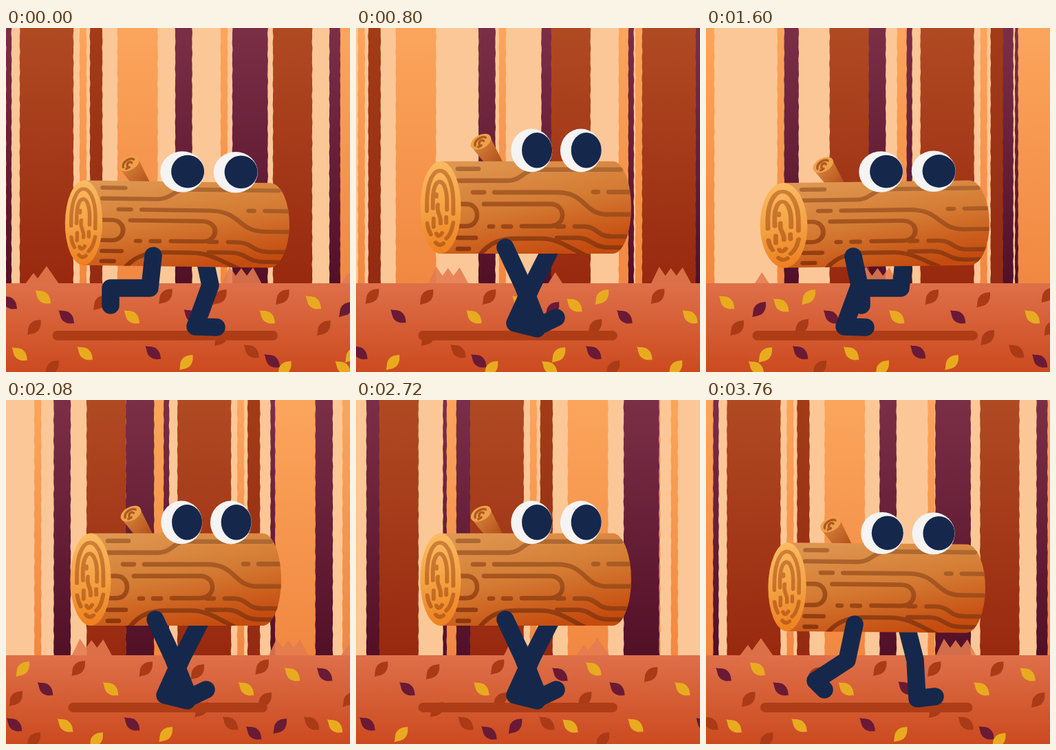
An HTML page with a canvas for the animation above (3840 ms loop, 500 by 500 pixels).

```html
<!DOCTYPE html>
<html lang="en">
<head>
<meta charset="utf-8">
<title>Walking log</title>
<style>
  html, body { margin: 0; width: 100%; height: 100%; overflow: hidden; background: #fcc797; }
  canvas { display: block; width: 500px; height: 500px; }
</style>
</head>
<body>
<canvas id="stage" width="500" height="500"></canvas>
<script>
const c = document.getElementById('stage').getContext('2d');
const STEP = 80, STEPS = 48;
const NAVY = '#15284c', HORIZON = 371;

function grad(x0, y0, x1, y1, ...stops) {
  const g = c.createLinearGradient(x0, y0, x1, y1);
  stops.forEach((s, i) => g.addColorStop(i / (stops.length - 1), s));
  return g;
}
const down = (a, b) => grad(0, 0, 0, HORIZON, a, b);
const BARK = {
  brown: down('#b04a23', '#98290f'),
  dark: down('#a23c17', '#942a12'),
  orange: down('#fba55c', '#f18841'),
  purple: down('#7b2f47', '#521027')
};
const GROUND = grad(0, HORIZON, 0, 500, '#de7049', '#cc4a1f');
const LEAF = { Y: '#e8ab20', P: '#6a1a35', B: '#aa3b16' };

// Front trees: x, width, bark; they repeat every 500 px.
const TREES = [
  [20, 78, 'brown'], [107, 10, 'orange'], [122, 18, 'dark'], [162, 58.5, 'orange'],
  [312, 10, 'orange'], [388, 57, 'brown'], [486, 15, 'orange'], [0, 8, 'purple']
];
// Far trees: x at loop start, x at loop end, width, bark, last step shown.
const FAR = [
  [470, 230, 24, 'purple', 12], [970, 470, 24, 'purple', 48],
  [486, 102, 10, 'orange', 41], [677, 330, 11, 'orange', 48],
  [329, 43, 51.5, 'purple', 48], [535, 329, 51.5, 'purple', 48],
  [246, -80, 24.5, 'purple', 48], [548, 246, 24.5, 'purple', 48]
];

// Leaves on a 1000 px ground strip: "x y colour+tilt".
const LEAVES = `5 399 P\\,54 391 Y\\,88 420 P\\,137 399 B/,183 420 Y\\,232 390 B/,270 419 P\\,311 391 B/,
380 420 Y\\,402 391 B/,447 399 Y\\,494 409 P/,526 403 Y\\,566 391 Y/,599 420 P\\,647 390 B/,694 420 Y\\,
745 391 B/,783 420 P\\,820 395 B/,891 420 Y\\,914 388 B/,958 399 Y\\,41 435 B/,313 451 B/,
462 436 B/,556 434 B/,826 450 B/,918 436 B/,20 474 Y\\,67 494 B/,115 473 Y\\,
214 472 P\\,262 486 Y/,357 470 B\\,387 484 P\\,405 495 Y/,503 475 Y/,490 494 Y\\,554 472 P\\,
582 494 B/,628 473 Y\\,673 494 Y/,725 471 P\\,774 486 Y/,868 470 B\\,902 484 P\\,940 474 P/,
986 470 B\\`.split(',').map(s => {
  const [x, y, k] = s.trim().split(' ');
  return { x: +x, y: +y, fill: LEAF[k[0]], turn: k[1] === '/' ? -0.85 : 0.7 };
});
const leafShape = new Path2D('M-15 0C-9 -3 -6 -8 1 -7.5C8 -7 11 -3 14.5 0C11 3 8 7 1 7.5C-6 8 -9 3 -15 0Z');

const tuft = new Path2D('M-24 0L-12 -16L-6 -8L7 -26L25 0Z');
const tufts3 = new Path2D('M-27 0L-15 -25L-6 -12L2 -23L10 -12L19 -24L32 0Z');
const spike = new Path2D('M-11 0L0 -17L11 0Z');
const GRASS = [[52, tuft], [340, tufts3], [498, spike], [664, tufts3], [950, tufts3]];

const grain = new Path2D(
  'M148 205H178M148 222H222C240 222 244 206 262 206H385M170 239H186' +
  'M201 239H292C335 239 330 271 366 271H400M345 238.5H352M367 238.5H400' +
  'M148 256H161C181 256 181 288 161 288H148M186 256H282C306 256 306 288 282 288H241' +
  'M194 288.5H199M214 288.5H225M292 288.5H302M318 288.5H330C352 288.5 348 303 372 303H400' +
  'M148 305H174M148 321H164M180 330C194 311 212 306 234 306H268C292 306 305 316 332 330' +
  'M292 305H322C342 305 344 319 366 319H394');
const rings = new Path2D(
  'M103.500 266V252C105 192 139 194 141 250V270M112 262V248C113 214 131 216 132 250V264' +
  'M117 242V245M119 257C117 272 124 270 123 284M131 275V283M104 284Q105 293 109 300' +
  'M113 277V289M141 283Q138 300 131 306M117 299Q120 306 125 298M116 312Q121 318 127 313');

// Leg joints over one stride: hip, knee, ankle, toe.
const STRIDE = [
  [214, 331, 209, 378, 152, 378, 152, 403],
  [215, 327, 223, 377, 212, 407, 228, 419],
  [217, 319, 243, 375, 266, 433, 291, 421],
  [217, 327, 230, 378, 233, 434, 259, 431],
  [214, 332, 223, 374, 201, 434, 232, 435],
  [215, 325, 198, 383, 178, 431, 207, 434],
  [210, 319, 182, 374, 157, 429, 189, 437],
  [216, 326, 205, 378, 159, 408, 172, 421]
];

const mod = (a, n) => ((a % n) + n) % n;

function oval(x, y, rx, ry, fill, turn = 0) {
  c.beginPath();
  c.ellipse(x, y, rx, ry, turn, 0, Math.PI * 2);
  c.fillStyle = fill;
  c.fill();
}

function at(x, y, shape, fill, turn = 0) {
  c.save();
  c.translate(x, y);
  c.rotate(turn);
  c.fillStyle = fill;
  c.fill(shape);
  c.restore();
}

function tree(x, w, bark, seed) {
  if (x > 502 || x + w < -2) return;
  const rough = (y, p) => 0.25 * Math.sin(y * 0.23 + p) + 0.25 * Math.sin(y * 0.41 + p * 3);
  c.beginPath();
  for (let y = 0; y <= 372; y += 4) c.lineTo(x + rough(y, seed), y);
  for (let y = 372; y >= 0; y -= 4) c.lineTo(x + w + rough(y, seed + 2), y);
  c.fillStyle = BARK[bark];
  c.fill();
}

function scenery(k) {
  c.fillStyle = '#fcc797';
  c.fillRect(0, 0, 500, 500);
  FAR.forEach(([a, b, w, bark, last], i) => {
    if (k < last) tree(a + (b - a) * k / STEPS, w, bark, i * 1.7);
  });
  TREES.forEach(([x0, w, bark], i) => {
    const x = mod(x0 - 500 * k / STEPS, 500);
    tree(x, w, bark, i);
    tree(x - 500, w, bark, i);
  });
  const slide = 1000 * k / STEPS;
  const place = x => mod(x - slide + 40, 1000) - 40;
  GRASS.forEach(([x, shape]) => at(place(x), HORIZON + 1, shape, 'rgba(229,123,80,.87)'));
  c.fillStyle = GROUND;
  c.fillRect(0, HORIZON, 500, 129);
  LEAVES.forEach(l => at(place(l.x), l.y, leafShape, l.fill, l.turn));
}

function line(color, width) {
  c.strokeStyle = color;
  c.lineWidth = width;
  c.lineCap = c.lineJoin = 'round';
}

function leg(phase, dx) {
  const p = STRIDE[phase % 8];
  line(NAVY, 25.5);
  c.beginPath();
  for (let i = 0; i < 8; i += 2) c.lineTo(p[i] + dx, p[i + 1]);
  c.stroke();
}

function branch(x, y) {
  c.save();
  c.translate(x, y);
  c.beginPath();
  c.moveTo(-14, 7);
  c.lineTo(8, 34);
  c.lineTo(34, 34);
  c.lineTo(14, -6);
  c.fillStyle = grad(-8, 0, 24, 30, '#d9853c', '#b5541d');
  c.fill();
  oval(0, 0, 16, 9.8, '#efa04c', -0.5);
  c.rotate(-0.5);
  line('#b05a20', 3.4);
  c.stroke(new Path2D('M-10 1C-8 -7 6 -7 9 -2M-4 2C-2 -3 4 -2 4 1M-7 5H-2'));
  c.restore();
}

function log(k, bounce, sway) {
  const cx = 118 - 5 * bounce, right = 406 + 6 * bounce;
  const top = 208.6 + 14.8 * bounce, bottom = 337.3 + 9.3 * bounce;
  const rx = 29.6 - 3.6 * sway + 1.2 * sway * sway;
  const sy = (bottom - top) / 134;

  c.save();
  c.translate(250, (top + bottom) / 2);
  c.rotate(0.014 * sway);
  c.translate(-250, -(top + bottom) / 2);

  branch(178 + 3 * sway - 3.5 * bounce, top - 27 + 1.5 * bounce);

  // The body is laid out for its highest position and stretched from there.
  c.save();
  c.translate(cx, top);
  c.scale((right - cx) / 277, sy);
  c.translate(-123, -194);
  c.beginPath();
  c.moveTo(123, 194);
  c.lineTo(373, 194);
  c.ellipse(373, 261, 27, 67, 0, -Math.PI / 2, Math.PI / 2);
  c.lineTo(123, 328);
  c.closePath();
  c.fillStyle = grad(225, 184, 255, 336, '#df9650', '#d47b33', '#c54b0f');
  c.fill();
  c.clip();
  line(grad(0, 194, 0, 328, '#b06d35', '#a5531d', '#8c340b'), 6.6);
  c.stroke(grain);
  c.restore();

  c.save();
  c.translate(cx, top);
  c.scale(rx / 29, sy);
  c.translate(-123, -194);
  oval(123, 261, 29, 67, grad(115, 194, 131, 328, '#fcbb62', '#f4a345', '#ee7f1e'));
  line(grad(0, 205, 0, 320, '#cf8038', '#bf6018'), 5.8);
  c.stroke(rings);
  c.restore();
  c.restore();
}

function eye(x, y, b) {
  oval(x, y, 31 + b, 30.6 - 0.8 * b, '#f5f4f3');
  oval(x + 7.8, y - 0.3, 23 + b, 24.8 - 0.9 * b, NAVY);
}

function draw(k) {
  const bounce = Math.cos(Math.PI * k / 2), sway = Math.cos(Math.PI * k / 4);
  scenery(k);

  line('#ae3d17', 14);
  c.beginPath();
  c.moveTo(86 - 11.5 * bounce, 447);
  c.lineTo(380.5 + 7.5 * bounce, 447);
  c.stroke();

  leg(k + 4, 74);
  log(k, bounce, sway);
  leg(k, 0);
  const y = 193.5 + 15.5 * bounce;
  eye(255.3 + sway, y, bounce);
  eye(329.6 + 1.5 * sway + 2.7 * bounce, y + 0.7 * sway, bounce);
}

const start = performance.now();
let shown = -1;
function tick() {
  const k = Math.floor((performance.now() - start) / STEP) % STEPS;
  if (k !== shown) draw(shown = k);
  requestAnimationFrame(tick);
}
tick();
</script>
</body>
</html>
```
